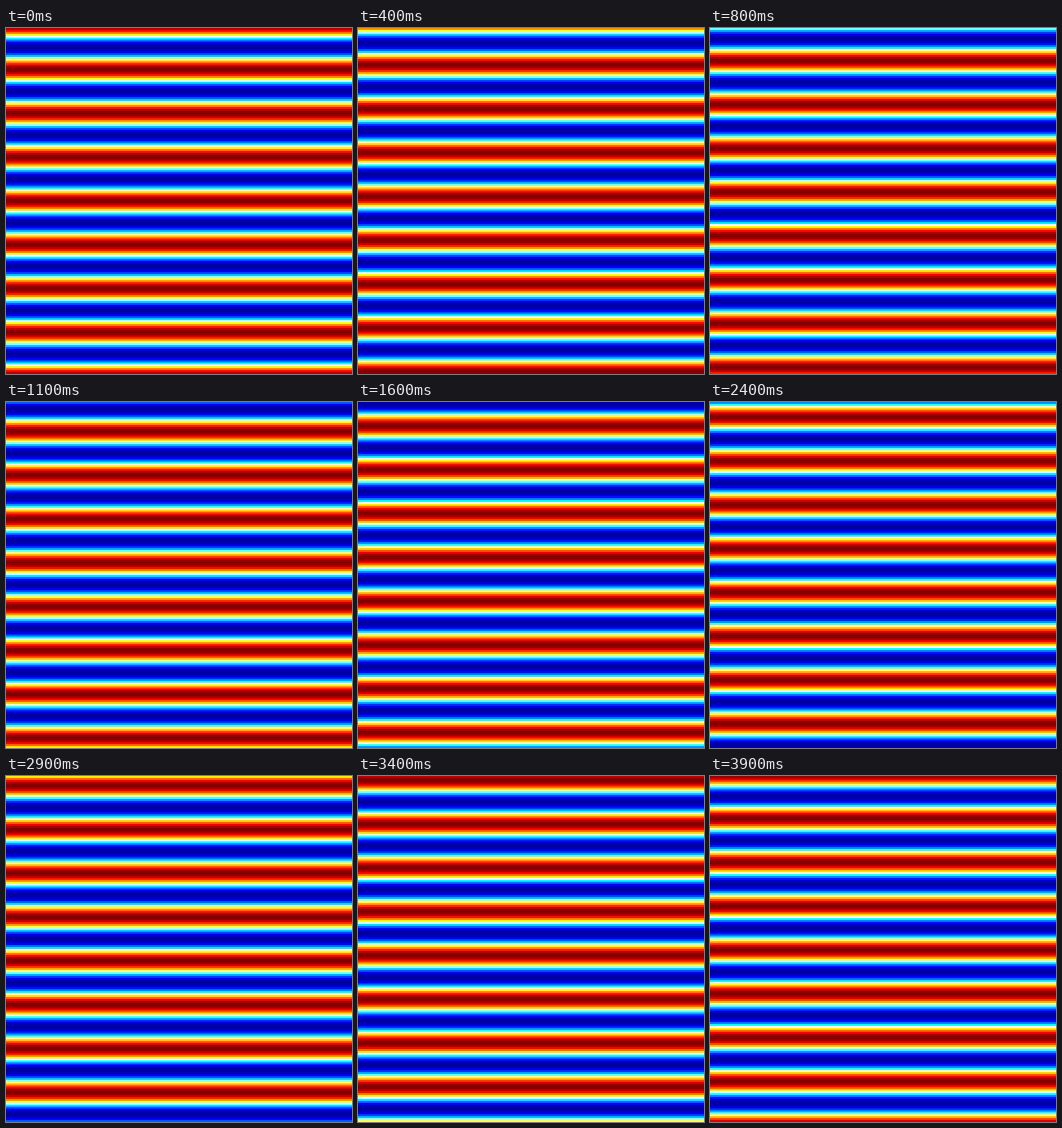
An HTML page with a canvas for the animation above (4 s loop, 360 by 360 pixels).

```html
<!DOCTYPE html>
<html>
<head>
<meta charset="utf-8">
<style>
  html, body { margin: 0; width: 100%; height: 100%; overflow: hidden; }
  canvas { display: block; width: 360px; height: 360px; }
</style>
</head>
<body>
<canvas id="stage" width="360" height="360"></canvas>
<script>
const SIZE = 360, ROW = 2;
const LOOP = 4000, STEP = 100;
const WAVE = SIZE * 0.633 / 5;   // stripe period in px
const CREST = SIZE / 2;          // centre of a red stripe at time 0

const ctx = document.getElementById('stage').getContext('2d');

// Colour map: position in 0..1, then red, green, blue
const STOPS = [
  [0, 0, 0, 160],
  [0.125, 0, 0, 255],
  [0.375, 0, 255, 255],
  [0.5, 255, 255, 255],
  [0.625, 255, 255, 0],
  [0.875, 255, 0, 0],
  [1, 128, 0, 0]
];

function color(v) {
  const i = Math.max(1, STOPS.findIndex(s => v <= s[0]));
  const [p, ...from] = STOPS[i - 1], [q, ...to] = STOPS[i];
  const k = (v - p) / (q - p);
  return `rgb(${from.map((c, n) => Math.round(c + (to[n] - c) * k))})`;
}

function draw(time) {
  const step = Math.floor((time % LOOP) / STEP);
  const crest = CREST - WAVE * step * STEP / LOOP;
  for (let y = 0; y < SIZE; y += ROW) {
    const phase = 2 * Math.PI * (y + ROW / 2 - crest) / WAVE;
    ctx.fillStyle = color(0.5 + 0.5 * Math.cos(phase));
    ctx.fillRect(0, y, SIZE, ROW);
  }
}

const start = performance.now();
function tick() {
  draw(performance.now() - start);
  requestAnimationFrame(tick);
}
tick();
</script>
</body>
</html>
```
